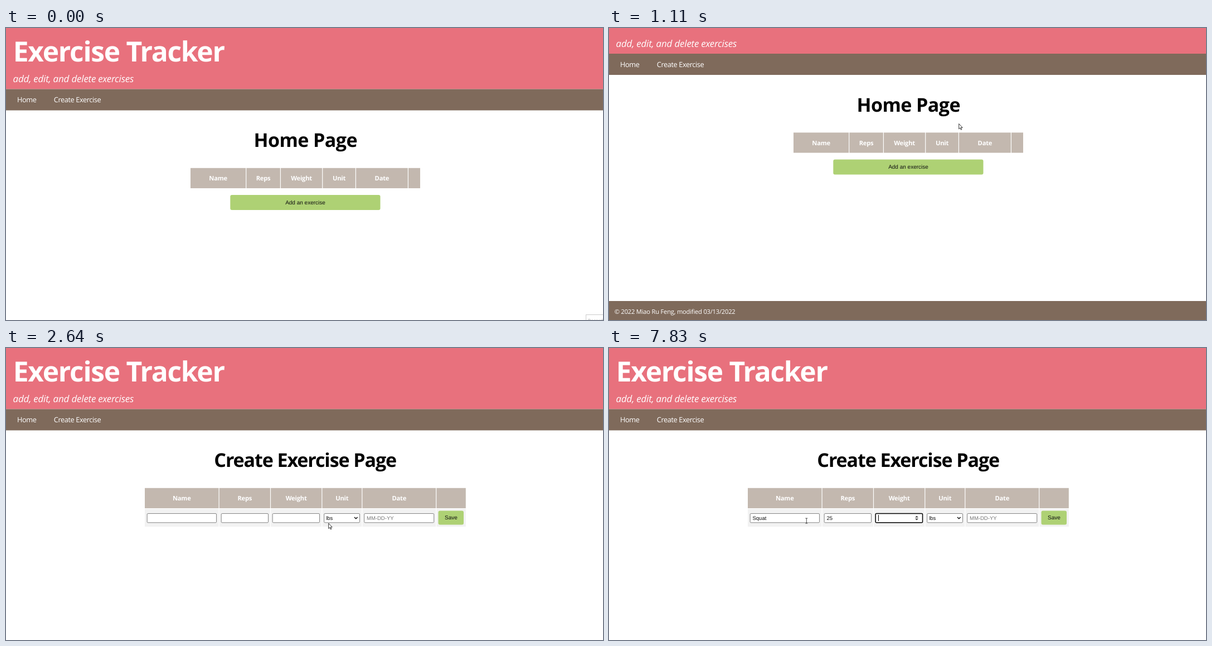
These frames come from a looping animation (1071x523 px, 8 s). An HTML page:

```html
<!DOCTYPE html>
<html lang="en">
<head>
<meta charset="utf-8">
<title>Exercise Tracker</title>
<style>
  html, body { margin: 0; width: 100%; height: 100%; overflow: hidden; background: #fff; }
  svg { display: block; }
  text { font-family: "Open Sans", "Noto Sans", sans-serif; fill: #fff; text-rendering: geometricPrecision; }
  .title { font-size: 49.7px; font-weight: 700; letter-spacing: -.0255em; }
  .tagline { font-size: 17px; font-style: italic; letter-spacing: -.0115em; }
  .nav { font-size: 12.8px; letter-spacing: -.033em; }
  .foot { font-size: 11.2px; letter-spacing: -.02em; }
  .h1 { font-size: 34px; font-weight: 700; fill: #000; text-anchor: middle; letter-spacing: -.017em; }
  .h1.long { letter-spacing: -.032em; }
  .th { font-size: 11.2px; font-weight: 700; text-anchor: middle; letter-spacing: -.02em; }
  .btn, .field { font-family: "Liberation Sans", Arial, sans-serif; fill: #111; }
  .btn { font-size: 10px; text-anchor: middle; }
  .field { font-size: 9.5px; }
  .hint { fill: #757575; }
  .box { fill: #fff; stroke: #858585; }
  .box.focus { stroke: #000; stroke-width: 1.5; }
  .cell { fill: #c3b8af; }
  .row { fill: #f2f2f2; }
  .green { fill: #aed174; }
  .brown { fill: #7f6a5b; }
  .pink { fill: #e8717d; }
  .tip { font-size: 8.3px; fill: #aaa; }
</style>
</head>
<body>
<svg width="1071" height="523" viewBox="0 0 1071 523">
  <g id="doc">
    <rect class="pink" width="1071" height="109.5"/>
    <text class="title" x="12.7" y="60.2">Exercise Tracker</text>
    <text class="tagline" x="12.5" y="97.2">add, edit, and delete exercises</text>
    <rect class="brown" y="109.5" width="1071" height="38"/>
    <text class="nav" x="20" y="133.3">Home</text>
    <text class="nav" x="85.8" y="133.3">Create Exercise</text>
    <g id="home"></g>
    <g id="create"></g>
    <rect class="brown" y="552.5" width="1071" height="34"/>
    <text class="foot" x="9.7" y="575.7">© 2022 Miao Ru Feng, modified 03/13/2022</text>
  </g>
  <g id="tip">
    <rect x="1040.5" y="513.5" width="40" height="20" fill="#fff" stroke="#ccc"/>
    <text class="tip" x="1044" y="526.5">Recording</text>
  </g>
  <g id="cursor">
    <path id="arrow" d="M0 0v9.4l2.1-2 1.6 3.4 1.4-.6-1.5-3.3h2.9z" fill="#fff" stroke="#000" stroke-width=".8"/>
    <path id="beam" d="M-2-4.5h4M0-4.5v9M-2 4.5h4" fill="none" stroke="#222" stroke-width=".8"/>
  </g>
</svg>
<script>
const $ = id => document.getElementById(id);
const show = (id, on) => $(id).style.display = on ? '' : 'none';
const rect = (cls, x, y, w, h, r = 0) =>
  `<rect class="${cls}" x="${x}" y="${y}" width="${w}" height="${h}" rx="${r}"/>`;
const text = (cls, x, y, s) => `<text class="${cls}" x="${x}" y="${y}">${s}</text>`;

const labels = ['Name', 'Reps', 'Weight', 'Unit', 'Date', ''];

// Table cells between the given column edges, with thin white gaps
function cells(edges, cls, y, h, names) {
  return names.map((s, i) => {
    const x = edges[i], w = edges[i + 1] - x - 1.2;
    return rect(cls, x, y, w, h) + (s && text('th', x + w / 2, 273.2, s));
  }).join('');
}

const homeCols = [331, 431.3, 493, 568.3, 628, 722, 744.2];
const formCols = [249, 382.7, 475.1, 567.4, 639.4, 772.3, 826];

$('home').innerHTML = text('h1', 537.3, 213, 'Home Page') +
  cells(homeCols, 'cell', 250.8, 36.2, labels) +
  rect('green', 402.3, 299, 269.2, 27, 3) + text('btn', 537, 315.6, 'Add an exercise');

const input = (id, x, w) => `<g id="${id}">${rect('box', x + .2, 296.5, w - .7, 16.3, 1.5)}
  ${text('field', x + 4.5, 307.6, '')}
  <path class="spin" d="M${x + w - 14} 303.5l3-3 3 3zM${x + w - 14} 305.5l3 3 3-3z" fill="#444"/>
  <rect class="caret" y="299" width="1" height="11"/></g>`;

$('create').innerHTML = text('h1 long', 536.7, 213, 'Create Exercise Page') +
  cells(formCols, 'cell', 250.8, 36.2, labels) +
  cells(formCols, 'row', 288.2, 31.8, labels.map(() => '')) +
  input('name', 253, 125) + input('reps', 386, 85) + input('weight', 478, 85) +
  rect('box', 570.7, 296.5, 63.8, 16.3, 1.5) + text('field', 574.2, 307.6, 'lbs') +
  '<path d="M625 303l2.8 2.8 2.8-2.8" fill="none" stroke="#111" stroke-width="1.5"/>' +
  rect('box', 642.7, 296.5, 125, 16.3, 1.5) + text('field hint', 647, 307.6, 'MM-DD-YY') +
  rect('green', 775.5, 291.5, 45.5, 25, 3) + text('btn', 798.5, 307.4, 'Save');

// Each field: left edge, focus time, blur time, text and its key press times
const fields = [
  { id: 'name', x: 253, from: 3240, to: 6110, value: 'Squat', keys: [5430, 5630, 5700, 5830, 5900] },
  { id: 'reps', x: 386, from: 6110, to: 7830, value: '25', keys: [7500, 7630], number: true },
  { id: 'weight', x: 478, from: 7830, to: 9000, value: '', keys: [], number: true }
];

function drawField(f, t) {
  const g = $(f.id), box = g.querySelector('.box'), label = g.querySelector('text');
  const typed = f.keys.filter(k => k <= t);
  const focus = t >= f.from && t < f.to;
  const lastEvent = typed.length ? typed[typed.length - 1] : f.from;
  const lit = Math.floor((t - lastEvent) / 530) % 2 === 0;
  label.textContent = f.value.slice(0, typed.length);
  box.setAttribute('class', focus ? 'box focus' : 'box');
  g.querySelector('.spin').style.display = focus && f.number ? '' : 'none';
  const caret = g.querySelector('.caret');
  const width = typed.length ? label.getComputedTextLength() : 0;
  caret.setAttribute('x', f.x + 5 + Math.max(0, Math.floor(width - .4)));
  caret.style.display = focus && lit ? '' : 'none';
}

// Pointer path: time, x, y
const path = [
  [70, 1040, 512], [200, 830, 330], [330, 670, 205], [450, 627.7, 171.5],
  [2100, 627.7, 171.5], [2300, 606, 255], [2440, 588, 305], [2570, 582, 311],
  [2640, 578.7, 314], [2690, 578.7, 314], [2760, 562, 332], [2900, 500, 319],
  [3100, 395, 315], [3240, 358, 310], [3310, 354.3, 309.5]
];

function pointer(t) {
  const i = path.findIndex(p => p[0] > t);
  if (i < 0) return path[path.length - 1].slice(1);
  const [t0, x0, y0] = path[Math.max(0, i - 1)], [t1, x1, y1] = path[i];
  const k = t1 > t0 ? (t - t0) / (t1 - t0) : 0;
  return [x0 + (x1 - x0) * k, y0 + (y1 - y0) * k];
}

function scrollAt(t) {
  if (t < 1040 || t >= 1900) return 0;
  return t < 1110 ? 50.5 : t < 1830 ? 63.5 : 13;
}

function draw() {
  const t = performance.now() % 8000;
  const onForm = t >= 2570;
  $('doc').setAttribute('transform', `translate(0 ${-scrollAt(t)})`);
  show('home', !onForm);
  show('create', onForm);
  show('tip', t < 70);
  show('cursor', t >= 70);
  const [x, y] = pointer(t);
  const overName = onForm && x < 378 && y < 313;
  $('cursor').setAttribute('transform', `translate(${x} ${y})`);
  show('arrow', !overName);
  show('beam', overName);
  if (onForm) fields.forEach(f => drawField(f, t));
  requestAnimationFrame(draw);
}
draw();
</script>
</body>
</html>
```
